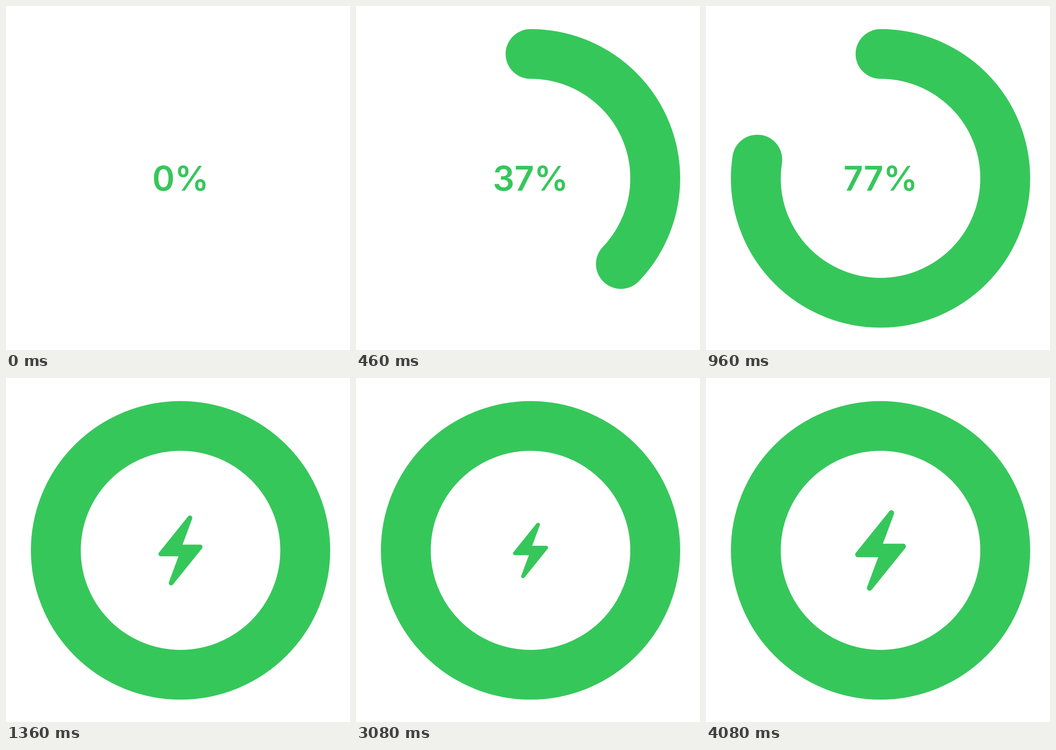
Animation, 747 px wide and 749 px high, one loop 4240 ms. Source, as an HTML page:

```html
<!DOCTYPE html>
<html lang="en">
<head>
<meta charset="utf-8">
<title>Charging</title>
<style>
  html, body { margin: 0; width: 100%; height: 100%; overflow: hidden; background: #fff; }
  svg { display: block; width: 100%; height: 100%; }
  text { font: 600 74px Inter, sans-serif; text-anchor: middle; }
</style>
</head>
<body>
<svg viewBox="0 0 747 749" fill="#36c75b" stroke="#36c75b">
  <circle id="ring" cx="379" cy="375.25" r="270.8" pathLength="100" fill="none"
    stroke-width="108.3" stroke-linecap="round" transform="rotate(-90 379 375.25)"/>
  <text id="label" x="379" y="402" stroke="none">0%</text>
  <path id="bolt" d="M24-83L-50 9H3.4L-24 83L50-9H-3.4Z" stroke-width="12" stroke-linejoin="round"/>
</svg>
<script>
  const LOOP = 4240, FULL = 1240, SHRINK = 2185, GROW = 3215, BEAT = 1030, SMALL = 2 / 3;
  const [ring, label, bolt] = ['ring', 'label', 'bolt'].map(id => document.getElementById(id));
  const show = (el, on) => el.setAttribute('visibility', on ? 'visible' : 'hidden');

  // Symmetric cubic-bezier(.44, 0, .56, 1), solved for x by bisection
  function ease(x) {
    if (x <= 0 || x >= 1) return x <= 0 ? 0 : 1;
    let lo = 0, hi = 1, s;
    for (let i = 0; i < 24; i++) {
      s = (lo + hi) / 2;
      const bx = 3 * s * (1 - s) * ((1 - s) * .44 + s * .56) + s ** 3;
      if (bx < x) lo = s; else hi = s;
    }
    return s * s * (3 - 2 * s);
  }

  // Overdamped spring: stiffness 500, damping 60, mass 1
  const spring = t => 1 - 1.25 * Math.exp(-10 * t) + .25 * Math.exp(-50 * t);
  const mix = (a, b, k) => a + (b - a) * k;

  function boltScale(t) {
    if (t < SHRINK) return mix(SMALL, 1, spring(Math.max(0, t - FULL - 15) / 1000));
    if (t < GROW) return mix(1, SMALL, ease((t - SHRINK) / BEAT));
    return mix(SMALL, 1, ease((t - GROW) / BEAT));
  }

  function draw(t) {
    const percent = Math.min(100, t / FULL * 100), charged = t >= FULL;
    show(ring, percent > 0);
    show(label, !charged);
    show(bolt, charged);
    ring.setAttribute('stroke-dasharray', charged ? 'none' : `${percent} 200`);
    label.textContent = Math.round(percent) + '%';
    bolt.setAttribute('transform', `translate(379 375.5) scale(${boltScale(t)})`);
  }

  let start;
  function tick(now) {
    start ??= now;
    draw((now - start) % LOOP);
    requestAnimationFrame(tick);
  }
  draw(0);
  requestAnimationFrame(tick);
</script>
</body>
</html>
```
